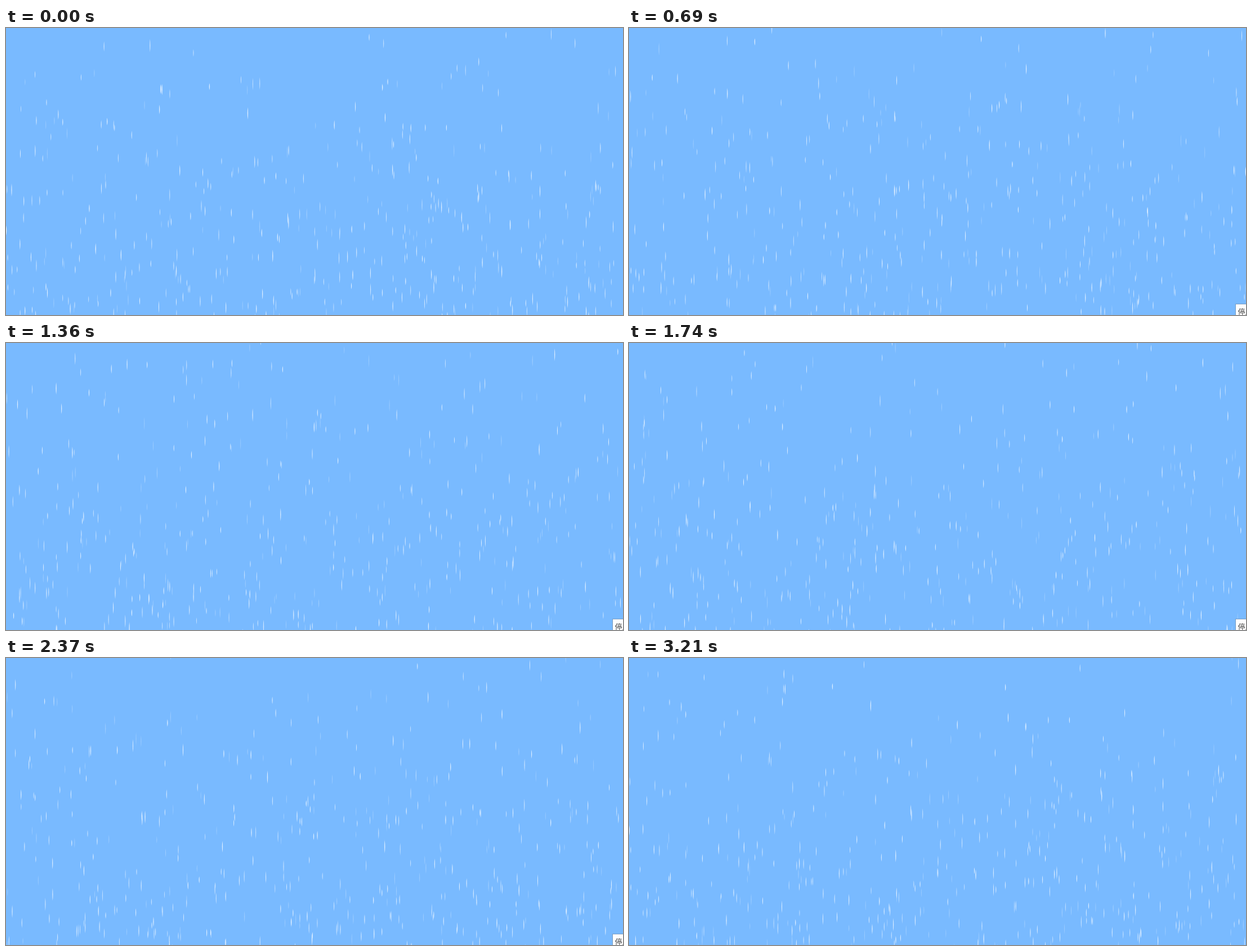
Write an HTML page that moves like this. It is 1096 by 511 pixels and loops after 3290 ms.

```html
<!DOCTYPE html>
<html lang="zh">
<head>
<meta charset="utf-8">
<title>Rain</title>
<style>
  html, body { margin: 0; width: 100%; height: 100%; overflow: hidden; background: #79baff; }
  svg { display: block; width: 1096px; height: 511px; }
  text { font: 13px "Noto Sans CJK SC", "Noto Sans CJK", sans-serif; fill: #444; }
</style>
</head>
<body>
<svg viewBox="0 0 1096 511">
  <rect width="1096" height="511" fill="#79baff"/>
  <g id="rain" fill="#fff"></g>
  <g id="button">
    <rect x="1077.5" y="491.5" width="60" height="40" fill="#fff" stroke="#7b9cc0"/>
    <text x="1081.5" y="510">停止</text>
  </g>
</svg>
<script>
const LOOP = 3290, WIDTH = 1096, HEIGHT = 511;
const ABOVE = 40, FALL = HEIGHT + ABOVE, COUNT = 860;
const LEVELS = 4;
const SHOW = 70, HIDE = 3110;

// Bursts of evenly spaced redraws: first, last, count.
const BURSTS = [
  [0, 0, 1], [70, 530, 7], [610, 1050, 7], [1150, 1660, 8], [1740, 1970, 4],
  [2110, 2110, 1], [2140, 2580, 7], [2660, 3110, 7], [3210, 3210, 1]
];

// The latest redraw at or before the given time, on a 10 ms grid.
function redrawTime(time) {
  const [first, last, count] = BURSTS.findLast(b => b[0] <= time);
  const gap = (last - first) / Math.max(1, count - 1);
  let i = count - 1;
  const at = k => Math.floor((first + k * gap) / 10 + 1e-6) * 10;
  while (at(i) > time) i--;
  return at(i);
}

function random(seed) {
  let n = Math.imul(seed + 1, 0x9e3779b1);
  n = Math.imul(n ^ (n >>> 16), 0x85ebca6b);
  n = Math.imul(n ^ (n >>> 13), 0xc2b2ae35);
  return ((n ^ (n >>> 16)) >>> 0) / 4294967296;
}

const drops = Array.from({ length: COUNT }, (_, i) => {
  const r = k => random(i * 16 + k);
  return {
    id: i,
    cycles: 4 + Math.floor(r(0) * 3),
    phase: r(1),
    height: 12 + 12 * r(2) ** 1.3,
    width: 1 + 0.4 * r(3),
    level: Math.floor(r(4) * LEVELS)
  };
});

const rain = document.getElementById("rain");
const button = document.getElementById("button");
const layers = Array.from({ length: LEVELS }, (_, i) => {
  const path = document.createElementNS("http://www.w3.org/2000/svg", "path");
  path.setAttribute("opacity", 0.25 + 0.5 * Math.sqrt(i / (LEVELS - 1)));
  return rain.appendChild(path);
});

// Each fall begins at a fresh place, so the rain thickens towards the ground.
function dropPath({ id, cycles, phase, width: w, height: h }, time) {
  const turn = time / LOOP * cycles + phase;
  const seed = 50000 + (id * 8 + Math.floor(turn) % cycles) * 2;
  const x = random(seed) * WIDTH;
  const y = (random(seed + 1) + turn % 1) * FALL - ABOVE - h / 2;
  if (y > HEIGHT || y + h < 0) return "";
  const f = n => n.toFixed(2);
  return `M${f(x)} ${f(y)}q${f(w)} ${f(h / 2)} 0 ${f(h)}q${f(-w)} ${f(-h / 2)} 0 ${f(-h)}z`;
}

function draw(time) {
  const paths = layers.map(() => "");
  for (const drop of drops) paths[drop.level] += dropPath(drop, time);
  layers.forEach((layer, i) => layer.setAttribute("d", paths[i]));
  button.style.display = time >= SHOW && time < HIDE ? "" : "none";
}

const start = performance.now();
let shown = -1;

function tick() {
  const time = redrawTime((performance.now() - start) % LOOP);
  if (time !== shown) draw(shown = time);
  requestAnimationFrame(tick);
}
tick();
</script>
</body>
</html>
```
